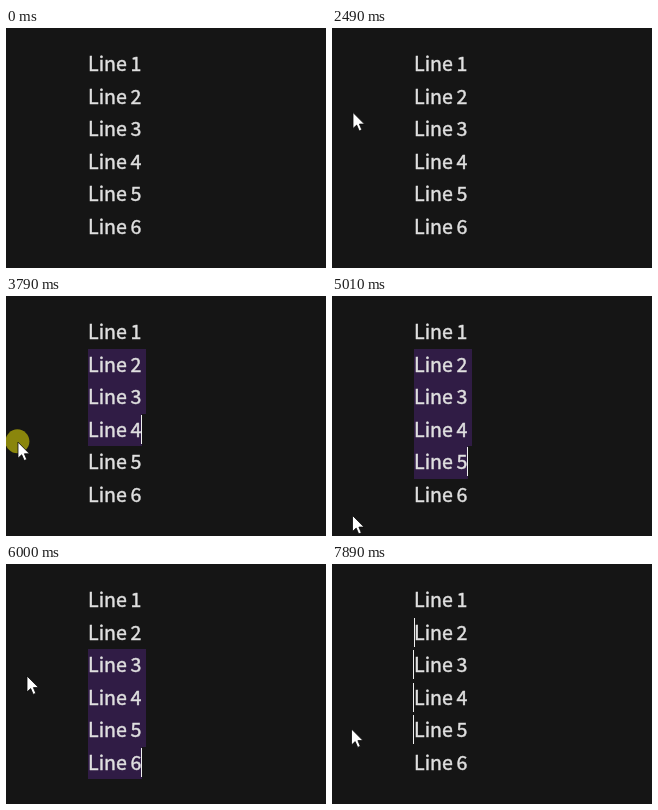
Recreate the animation shown at these times as an HTML page. Size 320x240 px, loop 8 s.

```html
<!DOCTYPE html>
<html lang="en">
<head>
<meta charset="utf-8">
<title>Line selection</title>
<style>
  html, body { margin: 0; width: 100%; height: 100%; overflow: hidden; background: #151515; }
  svg { display: block; width: 320px; height: 240px; }
  text {
    font: 19.6px "Noto Sans CJK JP", "Noto Sans CJK SC", "Noto Sans CJK", sans-serif;
    word-spacing: -.7px;
    fill: #e0e0e0;
    stroke: #e0e0e0;
    stroke-width: .45;
  }
  .selection { fill: #301c45; }
  .caret { fill: #f0f0f0; }
  #press { fill: #8a860c; }
  #arrow { fill: #fff; stroke: #0a0a0a; stroke-width: .8; }
</style>
</head>
<body>
<svg viewBox="0 0 320 240">
  <g id="rows"></g>
  <g id="pointer">
    <circle id="press" cx="-.6" cy="-.8" r="12"/>
    <path id="arrow" d="M0 0V16L3.7 12.6L6.2 18.4L8.8 17.3L6.4 11.6H11.5Z"/>
  </g>
</svg>
<script>
const LOOP = 8000, BLINK = 594;
const COUNT = 6, TOP = 20.5, PITCH = 32.5, LEFT = 82, END = 135;

// The pointer rests between moves; `bow` bends a move to the left
const moves = [];
let place = { x: 69, y: 236 };
function glide(start, span, x, y, bow = 0) {
  moves.push({ start, span, from: place, to: { x, y }, bow });
  place = { x, y };
}

// The selection follows the pointer from the pressed row
const presses = [];
function press(mode, down, up) {
  const drag = moves.filter(m => m.start >= down).pop();
  presses.push({ mode, down, up, settled: drag ? drag.start + drag.span : down });
}

glide(930, 700, 21.5, 43.5, 27);
press("caret", 1760, 1860);

glide(2360, 130, 21, 84.5);
glide(2890, 410, 18.7, 78.5);
glide(3560, 90, 12, 29);
glide(3650, 170, 12, 156);
press("lines", 3330, 4120);

glide(4620, 190, 20.5, 219.5);
glide(5480, 150, 17.4, 170.3);
glide(5670, 60, 18, 13);
glide(5730, 120, 19, 224);
glide(5850, 40, 21, 112);
press("lines", 5250, 6000);

glide(6140, 360, 43, 63);
glide(6770, 90, 38.5, 55);
glide(7320, 80, 23, 57);
glide(7620, 240, 19.5, 165);
press("column", 7420, 7880);

const byId = id => document.getElementById(id);
const pointer = byId("pointer"), disc = byId("press");

function add(tag, attrs) {
  const el = document.createElementNS("http://www.w3.org/2000/svg", tag);
  for (const key in attrs) el.setAttribute(key, attrs[key]);
  return byId("rows").appendChild(el);
}

const rows = Array.from({ length: COUNT }, (_, i) => {
  const y = TOP + i * PITCH, top = Math.floor(y);
  const selection = add("rect", { class: "selection", x: LEFT, y: top, height: Math.floor(y + PITCH) - top });
  add("text", { x: LEFT, y: y + 22.7 }).textContent = "Line " + (i + 1);
  const caret = add("rect", { class: "caret", y: top + 1, width: 1, height: 29 });
  return { selection, caret };
});

function show(el, on) {
  el.style.display = on ? "" : "none";
}

function pointAt(t) {
  const { start, span, from, to, bow } = moves.filter(m => m.start <= t).pop() || moves[0];
  const k = Math.max(0, Math.min(1, (t - start) / span));
  const ease = k * k * (3 - 2 * k);
  return {
    x: from.x + (to.x - from.x) * ease - bow * Math.sin(Math.PI * ease),
    y: from.y + (to.y - from.y) * ease
  };
}

function rowAt(t) {
  const row = Math.floor((pointAt(t).y - TOP) / PITCH);
  return Math.max(0, Math.min(COUNT - 1, row));
}

function caretX(mode, i, lo, hi) {
  if (mode === "lines") return i === hi ? END : null;
  if (i < lo || i > hi) return null;
  return i > lo ? LEFT - 1 : LEFT;
}

function draw(t) {
  const { x, y } = pointAt(t);
  show(pointer, t >= moves[0].start);
  pointer.setAttribute("transform", `translate(${x} ${y})`);

  const now = presses.filter(p => p.down <= t).pop();
  show(disc, now && t < now.up);

  let lo = -1, hi = -1, lit = false;
  if (now) {
    const a = rowAt(now.down), b = rowAt(Math.min(t, now.up));
    lo = Math.min(a, b);
    hi = Math.max(a, b);
    lit = t < now.settled || Math.floor((t - now.settled) / BLINK) % 2 === 0;
  }

  rows.forEach(({ selection, caret }, i) => {
    show(selection, now && now.mode === "lines" && i >= lo && i <= hi);
    selection.setAttribute("width", (i === hi ? 136 : 140) - LEFT);
    const cx = lit ? caretX(now.mode, i, lo, hi) : null;
    show(caret, cx !== null);
    if (cx !== null) caret.setAttribute("x", cx);
  });
}

const begin = performance.now();
function tick() {
  draw((performance.now() - begin) % LOOP);
  requestAnimationFrame(tick);
}
tick();
</script>
</body>
</html>
```
